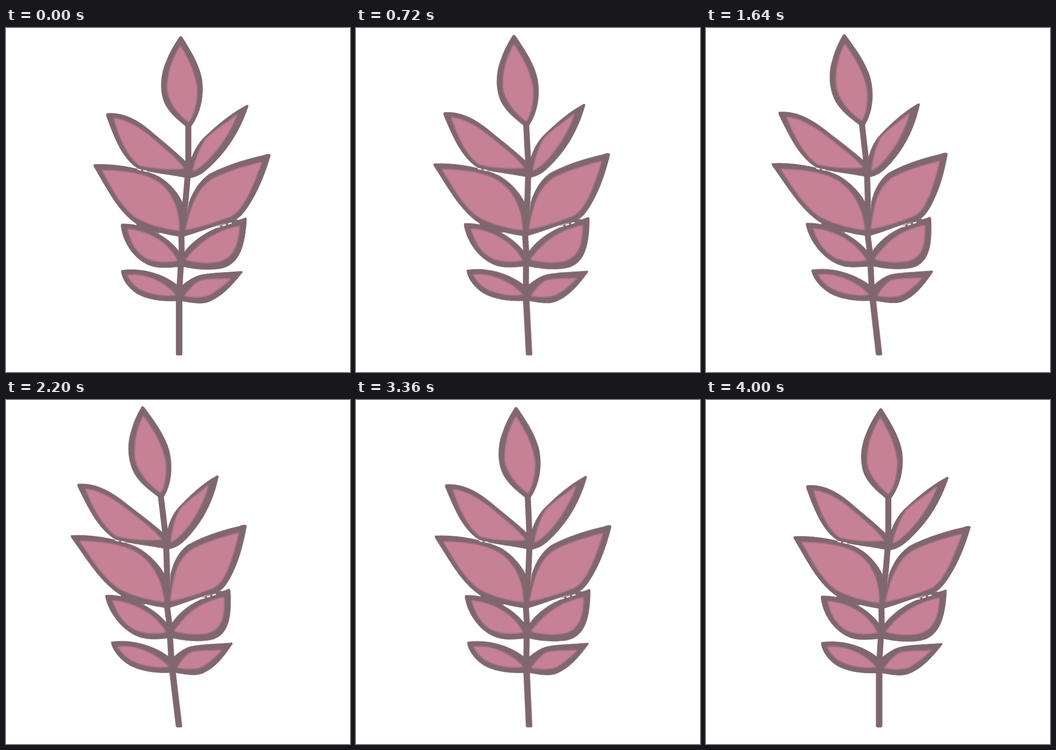
An HTML page for the animation above (4040 ms loop, 748 px wide and 748 px high).

```html
<!DOCTYPE html>
<html lang="en">
<head>
<meta charset="utf-8">
<title>Swaying leaf</title>
<style>
  html, body { margin: 0; width: 100%; height: 100%; overflow: hidden; background: #fff; }
  svg { display: block; width: 100vw; height: 100vh; }

  /* The plant leans from its foot and stretches a little as it goes. */
  .lean, .stretch { transform-box: view-box; transform-origin: 376.5px 712px; }
  .lean { animation: lean 4040ms infinite; }
  .stretch { animation: stretch 4040ms infinite; }
  @keyframes lean {
    0% { transform: skewX(0deg); animation-timing-function: cubic-bezier(.33, .3, .65, 1); }
    49.505% { transform: skewX(6.91deg); animation-timing-function: cubic-bezier(.35, 0, .67, .7); }
    99.01%, 100% { transform: skewX(0deg); }
  }
  @keyframes stretch {
    0% { transform: scaleY(1); animation-timing-function: cubic-bezier(.3, .6, .4, 1); }
    49.505% { transform: scaleY(1.006); animation-timing-function: cubic-bezier(.6, 0, .7, .4); }
    99.01%, 100% { transform: scaleY(1); }
  }

  .rim { fill: #80676f; stroke: #80676f; stroke-width: 1; stroke-linejoin: round; }
  .stem { fill: none; stroke-width: 13; }
  .seam { fill: none; stroke-width: 4; }
  .gaps { fill: none; stroke: #fff; stroke-width: 2.6; stroke-linecap: round; stroke-dasharray: 6 7; }
  .flesh { fill: #c78196; filter: url(#soft); }
</style>
</head>
<body>
<svg viewBox="0 0 748 748">
  <defs>
    <filter id="soft" filterUnits="userSpaceOnUse" x="150" y="0" width="460" height="640" color-interpolation-filters="sRGB">
      <feGaussianBlur stdDeviation="1.8"/>
    </filter>
  </defs>
  <g class="lean"><g class="stretch">
    <g class="rim">
      <path class="stem" d="M396.5 205V305L391 370 381.5 455 382 485 377.5 560 376.5 600"/>
      <rect x="370" y="585" width="13" height="126.5" rx="3"/>
      <!-- top leaf, then pairs going down: left, right -->
      <path d="M378 19Q380 17 383 20C398 44 420 78 426 112C431 150 422 186 403 213L390 213C376 201 356 186 345 163C333 135 337 98 349 72C356 53 368 33 378 19Z"/>
      <path d="M219 186C262 182 296 207 326 234C350 254 372 272 390 290L398 327C362 318 318 316 288 306C254 286 236 240 218 190Z"/>
      <path d="M527 169Q525 166 520 170C490 186 456 214 430 239C416 254 408 270 403 284L396 327C418 324 432 314 455 290C490 254 512 214 527 169Z"/>
      <path d="M191 297C245 294 302 308 332 323C358 338 378 364 385 384L384 454C350 450 310 440 284 426C242 398 218 345 191 301Z"/>
      <path d="M574 275Q570 273 560 277C515 287 472 302 442 318C418 335 406 358 398 380L386 453C420 444 456 428 490 421C508 414 514 405 525 390C550 352 563 316 575 277Z"/>
      <path d="M251 426C296 424 350 450 377 487L384 518C356 521 330 524 310 515C276 500 254 464 250 430Z"/>
      <path d="M522 413C520 412 516 415 512 416C466 429 418 448 388 487L382 518C410 525 442 527 466 523C510 515 520 468 523 416Z"/>
      <path d="M251 527C296 521 340 534 371 558L380 593C340 596 306 590 284 577C266 565 254 548 251 532Z"/>
      <path d="M513 529C480 532 440 532 420 538C406 542 394 551 384 559L375 592C400 597 424 601 438 596C468 586 492 559 514 531Z"/>
      <path class="seam" d="M460 433L504 418M284 427L334 445"/>
    </g>
    <path class="gaps" d="M459 433.5L494 423M287 307.5L311 312.5"/>
    <g class="flesh">
      <path d="M379 38C360 68 350 100 350 132C352 160 374 188 397 205C410 188 416 160 416 136C413 100 396 65 379 38Z"/>
      <path d="M234 196C268 199 302 224 330 249C352 268 372 284 388 306C352 309 318 306 290 299C264 280 246 240 234 196Z"/>
      <path d="M503 187C484 204 452 222 434 241C420 262 410 290 406 312C426 304 450 278 470 250C486 226 496 208 503 187Z"/>
      <path d="M208 309C262 309 306 318 330 334C360 354 378 392 377 441C342 437 304 426 280 411C248 386 230 348 208 309Z"/>
      <path d="M557 291C515 301 478 313 450 327C414 350 402 388 390 439C424 433 462 420 486 411C516 400 538 342 557 291Z"/>
      <path d="M264 437C305 440 352 462 373 506C350 511 322 510 304 500C280 486 270 462 264 437Z"/>
      <path d="M508 430C465 439 428 456 390 504C412 511 440 513 464 508C500 498 506 462 508 430Z"/>
      <path d="M263 537C300 532 345 550 370 581C340 585 308 578 288 566C276 558 269 548 263 537Z"/>
      <path d="M490 544C466 546 436 544 420 550C406 558 396 571 387 583C410 587 432 587 446 579C464 568 478 556 490 544Z"/>
    </g>
  </g></g>
</svg>
</body>
</html>
```
